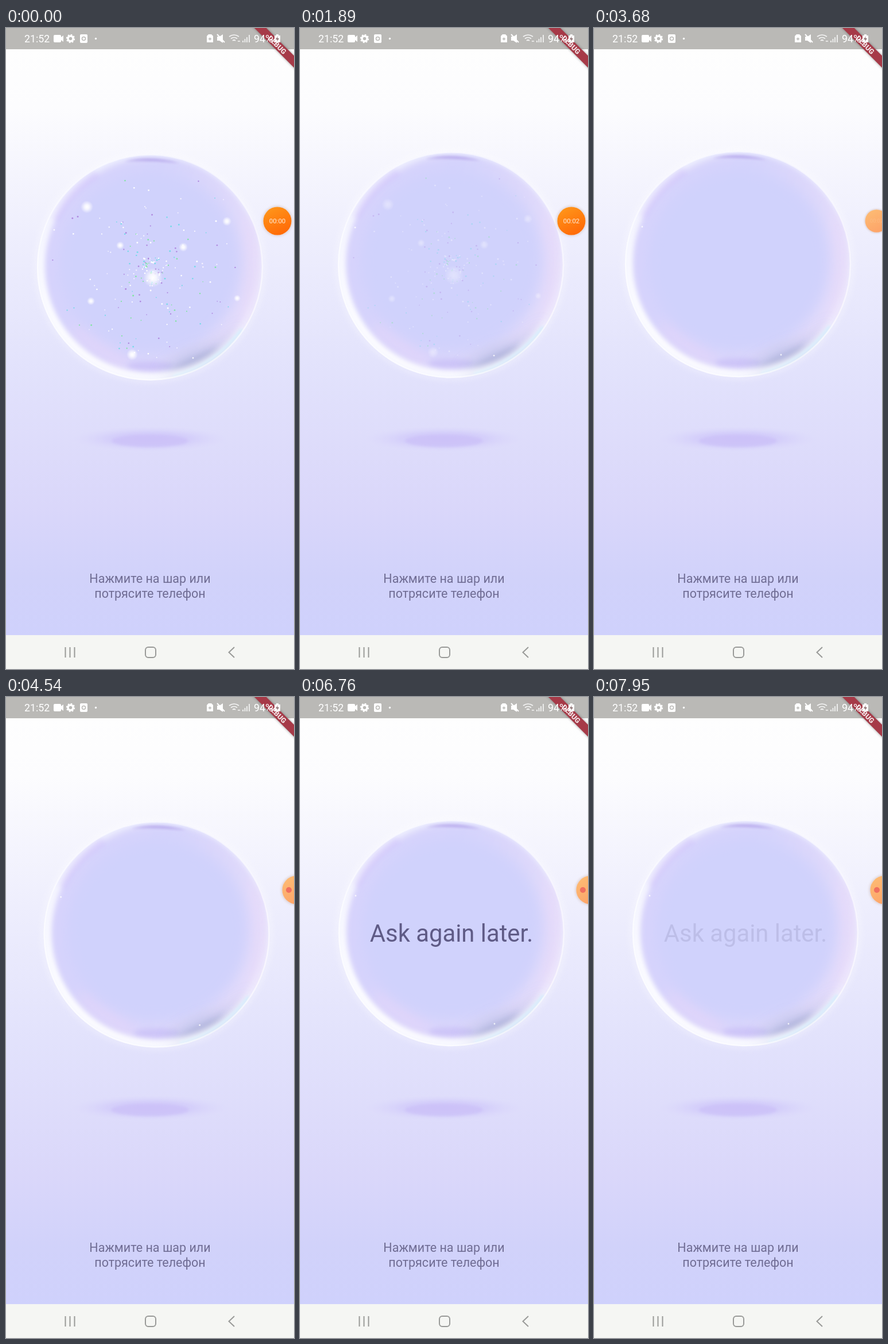
Animation of 502x1116 px, one loop 7990 ms. Source, as an HTML page:

```html
<!DOCTYPE html>
<html lang="ru">
<head>
<meta charset="utf-8">
<style>
  html, body { margin: 0; width: 100%; height: 100%; overflow: hidden; background: #fff; }
  svg { display: block; width: 100%; height: 100%; font-family: Roboto, sans-serif; }
</style>
</head>
<body>
<svg viewBox="0 0 502 1116">
  <defs>
    <linearGradient id="sky" x2="0" y2="1">
      <stop offset="0" stop-color="#fefefe"/>
      <stop offset=".1" stop-color="#fcfcfe"/>
      <stop offset=".32" stop-color="#eeeefd"/>
      <stop offset=".55" stop-color="#e2e2fc"/>
      <stop offset=".78" stop-color="#dad7fa"/>
      <stop offset=".9" stop-color="#d1d2fa"/>
      <stop offset="1" stop-color="#cfd1fc"/>
    </linearGradient>
    <linearGradient id="shell" x2="1" y2=".35">
      <stop offset="0" stop-color="#d8d3fc"/>
      <stop offset=".5" stop-color="#d5d3fc"/>
      <stop offset="1" stop-color="#e4dcfb"/>
    </linearGradient>
    <linearGradient id="rim" x1=".9" y1=".1" x2=".12" y2=".88">
      <stop offset=".1" stop-color="#fff" stop-opacity="0"/>
      <stop offset=".6" stop-color="#fff" stop-opacity=".45"/>
      <stop offset="1" stop-color="#fff"/>
    </linearGradient>
    <linearGradient id="orange" x2=".5" y2="1">
      <stop offset="0" stop-color="#ff9a1c"/>
      <stop offset="1" stop-color="#ff6c08"/>
    </linearGradient>
    <radialGradient id="spark">
      <stop offset="0" stop-color="#fff"/>
      <stop offset=".35" stop-color="#fff" stop-opacity=".8"/>
      <stop offset="1" stop-color="#fff" stop-opacity="0"/>
    </radialGradient>
    <radialGradient id="haze">
      <stop offset="0" stop-color="#cdc2f8"/>
      <stop offset=".55" stop-color="#d1cafa" stop-opacity=".8"/>
      <stop offset="1" stop-color="#dad6fb" stop-opacity="0"/>
    </radialGradient>
    <clipPath id="round"><circle r="197"/></clipPath>
    <filter id="b2" x="-50%" y="-100%" width="200%" height="300%"><feGaussianBlur stdDeviation="2"/></filter>
    <filter id="b5" x="-50%" y="-100%" width="200%" height="300%"><feGaussianBlur stdDeviation="5"/></filter>
    <filter id="b12" x="-60%" y="-100%" width="220%" height="300%"><feGaussianBlur stdDeviation="12"/></filter>
  </defs>

  <rect y="37" width="502" height="1021" fill="url(#sky)"/>

  <g id="shadow">
    <ellipse cy="-2" rx="138" ry="22" fill="url(#haze)" opacity=".85"/>
    <ellipse cy="1" rx="68" ry="11" fill="#cbc0f8" opacity=".7" filter="url(#b2)"/>
  </g>

  <g id="ball">
    <circle r="198" fill="none" stroke="#fff" stroke-width="7" opacity=".35" filter="url(#b5)"/>
    <g clip-path="url(#round)">
      <circle r="197" fill="#eff1ff"/>
      <circle cx="3" cy="-3" r="190" fill="url(#shell)" filter="url(#b5)"/>
      <ellipse cx="172" cy="10" rx="14" ry="105" fill="#e7dbfa" filter="url(#b12)"/>
      <ellipse cx="-85" cy="138" rx="62" ry="16" transform="rotate(35 -85 138)" fill="#e2d5fa" filter="url(#b12)"/>
      <ellipse cx="0" cy="172" rx="40" ry="9" fill="#cdc4f8" filter="url(#b5)"/>
      <circle cx="2" cy="-6" r="160" fill="#d0d2fc" filter="url(#b12)"/>
      <path d="M-166-82Q-143-132-92-162" fill="none" stroke="#cdc2fb" stroke-width="10" filter="url(#b5)"/>
      <path d="M-45-184Q0-196 52-181Q0-187-45-184" fill="#b3a4ea" filter="url(#b2)"/>
      <path d="M20 182Q60 148 105 138T165 85Q140 158 82 178T20 182" fill="#b2b9e2" opacity=".8" filter="url(#b12)"/>
      <path d="M34 180Q75 158 120 138Q95 172 34 180" fill="#a5a9d2" opacity=".65" filter="url(#b5)"/>
      <path d="M40 189Q112 172 160 108" fill="none" stroke="#cbe8fb" stroke-width="5" filter="url(#b2)"/>
      <circle r="190" fill="none" stroke="url(#rim)" stroke-width="12" filter="url(#b5)"/>
    </g>
    <circle r="196" fill="none" stroke="#fff" stroke-width="2.5" opacity=".6"/>
    <circle cx="75" cy="158" r="1.4" fill="#fff" opacity=".8"/>
    <circle cx="-167" cy="-65" r="1.4" fill="#fff" opacity=".8"/>
    <g id="stars"></g>
    <text id="answer" y="15" font-size="41.8" text-anchor="middle" fill="#5f5b86">Ask again later.</text>
  </g>

  <g font-size="21.5" text-anchor="middle" fill="#706d94">
    <text x="251" y="966">Нажмите на шар или</text>
    <text x="251" y="992">потрясите телефон</text>
  </g>

  <g id="recorder">
    <circle r="26" fill="#b58f78" opacity=".35" filter="url(#b2)"/>
    <circle r="24.5" fill="#fbe9e0"/>
    <circle id="disc" r="24.5" fill="url(#orange)"/>
    <text id="timer" y="4" font-size="11.5" text-anchor="middle" fill="#fff"></text>
    <circle id="dot" cx="-13" r="5" fill="#f0705f"/>
  </g>

  <rect width="502" height="37" fill="#bab9b6"/>

  <g transform="translate(502 0) rotate(45)">
    <rect x="-60" y="34.2" width="120" height="14.6" fill="#333" opacity=".5" filter="url(#b2)"/>
    <rect x="-60" y="34.2" width="120" height="14.6" fill="#a63a48"/>
    <text y="45.9" font-size="12.4" font-weight="900" text-anchor="middle" fill="#fff" opacity=".85">DEBUG</text>
  </g>

  <g fill="#fff">
    <text x="32" y="24.5" font-size="17.8">21:52</text>
    <path d="M85 12h9q2 0 2 2v2l4-3v11l-4-3v2q0 2-2 2h-9q-2 0-2-2v-9q0-2 2-2z"/>
    <circle cx="112.5" cy="18.5" r="4.5" fill="none" stroke="#fff" stroke-width="3.5"/>
    <circle cx="112.5" cy="18.5" r="6.7" fill="none" stroke="#fff" stroke-width="2" stroke-dasharray="2.8 2.46"/>
    <rect x="129" y="11" width="13" height="15" rx="2"/>
    <circle cx="135.5" cy="18.5" r="3" fill="none" stroke="#bab9b6" stroke-width="1.5"/>
    <circle cx="156.5" cy="18.5" r="1.7"/>
    <path d="M353 11h5l3 3v11h-11v-11z"/>
    <path d="M353 19h5M355.500 16.500v5" stroke="#bab9b6" stroke-width="1.5"/>
    <path d="M368 15h4l6-4v15l-6-4h-4z"/>
    <path d="M368 11l13 14" stroke="#fff" stroke-width="2"/>
    <g fill="none" stroke="#fff" stroke-width="1.7" opacity=".85">
      <path d="M389 15q8.500-6 17 0M392 18.500q5.500-4 11 0M395 22q2.500-2 5 0M404 23h4"/>
      <path d="M413 25v-3M416.500 25v-6M420 25v-9M424 25v-13"/>
    </g>
    <text x="432" y="24.5" font-size="17.8">94%</text>
    <path d="M471 11h4v2h3v12h-10v-12h3z"/>
    <path d="M474 14l-4 6h3l-1 4 4-6h-3z" fill="#8d6f70"/>
  </g>

  <rect y="1057" width="502" height="59" fill="#f5f6f3"/>
  <g fill="none" stroke="#999a98" stroke-width="2">
    <path d="M103.500 1078v18M111.500 1078v18M119.500 1078v18M398 1078l-9.500 9 9.500 9"/>
    <rect x="243" y="1078" width="18" height="18" rx="5"/>
  </g>
</svg>
<script>
const LOOP = 7990;
const el = id => document.getElementById(id);
const clamp = v => Math.max(0, Math.min(1, v));
const ramp = (t, from, to) => clamp((t - from) / (to - from));
const smooth = v => (1 - Math.cos(Math.PI * v)) / 2;

// Value at time t along [time, value] points.
function track(points, t, ease = v => v) {
  const i = points.findIndex(p => p[0] > t);
  if (i < 0) return points[points.length - 1][1];
  const [t0, v0] = points[i - 1], [t1, v1] = points[i];
  return v0 + (v1 - v0) * ease((t - t0) / (t1 - t0));
}

// Half swings from left to right, and the slow float.
const SWINGS = [[0, 0], [630, 3], [1090, 3], [2650, 7.22], [3680, 10], [5530, 16], [6760, 19], [7950, 23], [7990, 23.1]];
const FLOAT = [[0, 416.5], [630, 411], [1090, 411], [1500, 415], [2000, 412], [2650, 410], [3680, 411],
  [4300, 415], [4900, 410], [5530, 413], [6100, 415], [6760, 411], [7300, 415], [7950, 411]];

function circle(parent, cx, cy, r, fill) {
  const c = document.createElementNS("http://www.w3.org/2000/svg", "circle");
  Object.entries({ cx, cy, r, fill }).forEach(([k, v]) => c.setAttribute(k, v));
  parent.append(c);
}

function makeStars() {
  let seed = 21;
  const random = () => (seed = seed * 16807 % 2147483647) / 2147483647;
  const colors = ["#fff", "#fff", "#f4f0ff", "#7fe6a0", "#74dbe8", "#b08be0"];
  for (let i = 0; i < 220; i++) {
    const angle = random() * 2 * Math.PI;
    const reach = 8 + 165 * random() ** 1.7;
    circle(el("stars"), 2 + reach * Math.cos(angle), reach * Math.sin(angle),
      0.8 + random() * 0.7, colors[Math.floor(random() * colors.length)]);
  }
  [[-110, -105, 11], [134, -80, 8], [58, -35, 8], [-52, -38, 7], [5, 18, 17],
   [-103, 59, 7], [152, 54, 6], [-31, 152, 10]]
    .forEach(([x, y, r]) => circle(el("stars"), x, y, r, "url(#spark)"));
}

function draw(t) {
  const swing = Math.cos(Math.PI * track(SWINGS, t));
  const x = 257.5 - 6.5 * swing;
  const y = track(FLOAT, t, smooth);
  el("ball").setAttribute("transform", `translate(${x} ${y})`);
  el("shadow").setAttribute("transform", `translate(251 717.5) scale(${1 - (y - 411) * 0.004} 1)`);

  el("stars").setAttribute("opacity", 1 - ramp(t, 1250, 2250));
  el("answer").setAttribute("opacity", ramp(t, 4750, 5750) * (1 - ramp(t, 7100, 8120)));

  const dock = smooth(ramp(t, 2050, 2350));
  const tuck = smooth(ramp(t, 4050, 4350));
  const size = 1 - 0.19 * dock + 0.19 * tuck;
  el("recorder").setAttribute("transform", `translate(${473 + 19.5 * dock + 13.5 * tuck} 336) scale(${size})`);
  el("disc").setAttribute("opacity", 1 - 0.45 * dock);
  el("timer").setAttribute("opacity", 0.85 * (1 - dock) + 0.12 * dock * (1 - tuck));
  el("timer").textContent = `00:0${t < 800 ? 0 : t < 1800 ? 1 : 2}`;
  el("dot").setAttribute("opacity", tuck);
}

makeStars();
const start = performance.now();
function tick() {
  draw((performance.now() - start) % LOOP);
  requestAnimationFrame(tick);
}
tick();
</script>
</body>
</html>
```
